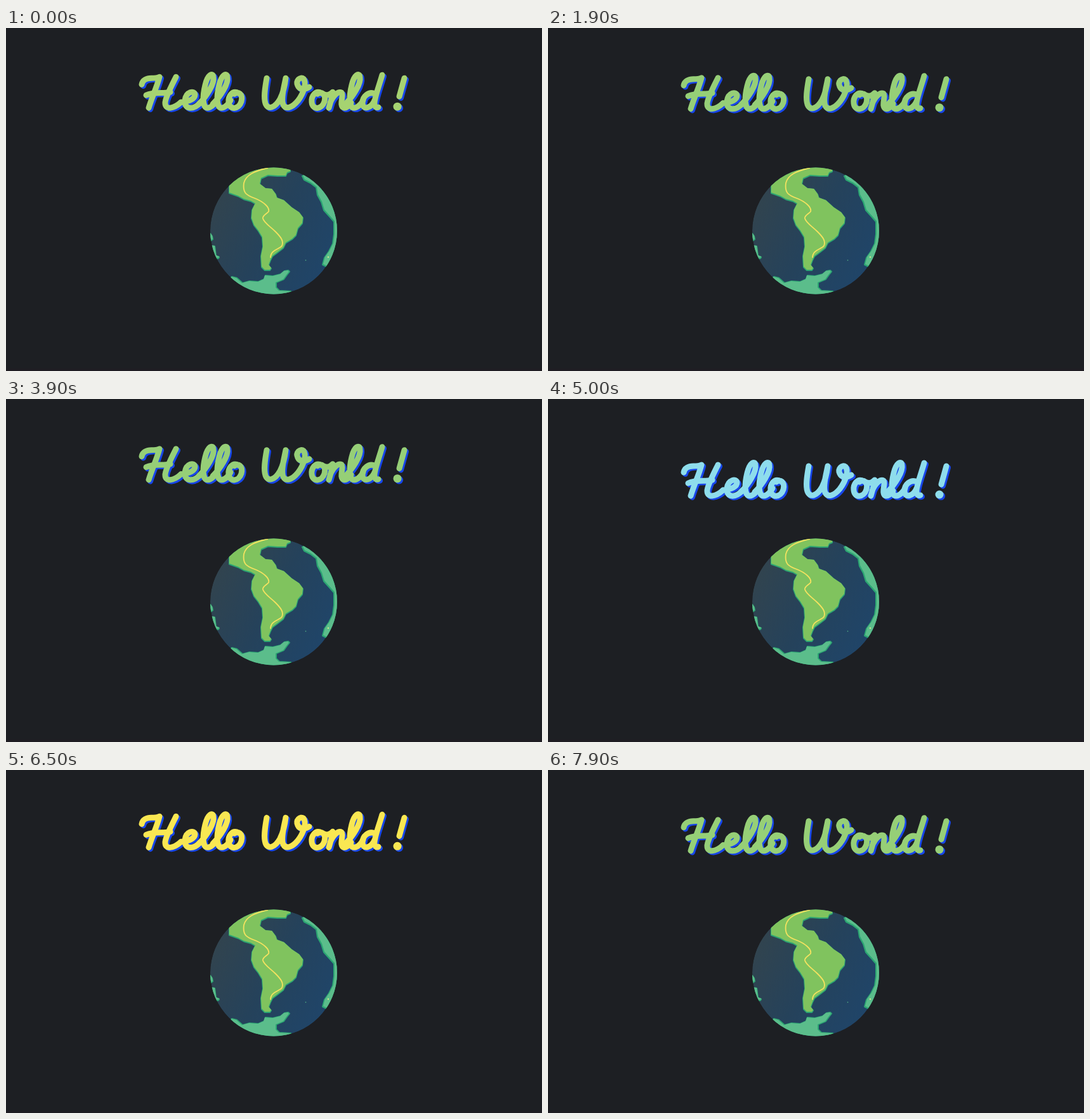
An HTML page for the animation above (8 s loop, 845 by 542 pixels).

```html
<!DOCTYPE html>
<html lang="en">
<head>
<meta charset="utf-8">
<title>Hello World !</title>
<style>
  html, body { margin: 0; width: 100%; height: 100%; overflow: hidden; background: #1d1f23; }
  svg { display: block; width: 100vw; height: 100vh; }
  .edge { fill: #2ca673; stroke: #2ca673; stroke-width: 2; stroke-linejoin: round; }
</style>
</head>
<body>
<svg viewBox="0 0 845 542" role="img" aria-label="Hello World !">
  <defs>
    <linearGradient id="ocean" x1="0" y1=".2" x2="1" y2=".75">
      <stop offset="0" stop-color="#33444d"/>
      <stop offset=".5" stop-color="#25425b"/>
      <stop offset="1" stop-color="#1f456a"/>
    </linearGradient>
    <clipPath id="disc"><circle cx="422" cy="320.5" r="100"/></clipPath>

    <path id="america" d="M352 215H448V226L443 228L441 233L428 233L413 232L402 237L400 246L409 253L419 254L425 262L427 268L438 272L450 283L462 291L468 299L467 308L460 316L457 327L451 333L441 339L437 347L428 354L420 360L417 366L414 374L418 379L416 382L408 382L403 377L402 360L405 345L404 330L398 320L391 311L387 300L388 287L393 277L386 273L375 270L366 265L352 260Z"/>
    <path id="africa" d="M468 233L471 239L481 244L490 251L492 263L498 274L502 287L511 297L518 305L518 325L516 340L510 352L503 362L500 373L508 377L540 340V250L490 225Z"/>
    <path id="antarctica" d="M355 393L363 395L372 403L383 400L397 401L406 397L408 391L420 392L432 389L438 384L444 383L446 385L442 390L437 397L425 402L425 410L430 415L448 416L450 425H370L350 402Z"/>
    <path id="islands" d="M320 321L325 328L326 333L322 336ZM322 343L329 344L331 359L336 361L335 363L328 364Z"/>

    <path id="ell" d="M304 120C316 108 329 88 327 77C326 70 318 73 314 90C310 106 309 126 318 126C324 126 330 118 332 114"/>
    <path id="oh" d="M367 103C356 97 350 109 351 117C352 130 367 129 371 116C374 104 366 99 360 104"/>

    <g id="lettering" fill="none" stroke="currentColor" stroke-width="9" stroke-linecap="round" stroke-linejoin="round">
      <path d="M214 89C215 82 222 79 229 79C236 79 240 78 242 77C238 93 230 109 225 126M221 106C234 100 250 104 259 101"/>
      <path d="M268 77C262 89 252 108 251 117C250 130 264 128 276 117"/>
      <path d="M276 117C290 116 298 111 298 105C297 98 284 100 282 114C281 130 296 129 306 118"/>
      <use href="#ell"/>
      <use href="#ell" x="22"/>
      <use href="#oh"/>
      <path d="M411 79C408 96 406 110 409 119C413 130 424 126 432 112C438 100 440 88 441 79C438 94 433 112 437 121C441 129 451 126 460 115C470 102 474 86 469 80C464 76 456 83 460 91C463 98 472 97 478 93"/>
      <use href="#oh" x="131"/>
      <path d="M503 105C508 107 512 104 515 101C514 110 511 119 509 126M511 118C516 106 524 99 529 102C533 106 524 124 533 126C537 127 541 122 544 118"/>
      <use href="#ell" x="231"/>
      <path d="M582 104C572 99 562 108 562 118C562 130 576 128 582 112M593 74C588 92 580 112 581 120C582 126 585 126 587 125"/>
      <path d="M628 79L620 108"/>
      <path d="M617 124h.1" stroke-width="13"/>
    </g>
  </defs>

  <rect width="845" height="542" fill="#1d1f23"/>
  <rect y="538" width="845" height="4" fill="#1f1d23"/>

  <g clip-path="url(#disc)">
    <circle cx="422" cy="320.5" r="100" fill="url(#ocean)"/>
    <g class="edge">
      <use href="#america" y="1"/>
      <use href="#africa" x="-1" y="1"/>
      <use href="#antarctica" x="1"/>
      <use href="#islands" y="1"/>
    </g>
    <use href="#america" fill="#80c35e"/>
    <g fill="#5bbd8b">
      <use href="#africa"/>
      <use href="#antarctica"/>
      <use href="#islands"/>
      <circle cx="472.5" cy="367" r=".8"/>
    </g>
    <circle cx="508" cy="362" r="1.3" fill="#c5e88c"/>
    <path d="M413 221C392 226 378 232 375 245C373 260 378 264 392 269C405 274 416 283 414 290C411 294 404 296 405 301C407 308 416 313 425 322C434 331 438 337 435 344C431 350 417 350 417 363" fill="none" stroke="#f4e25f" stroke-width="1.8"/>
  </g>

  <g id="title">
    <use href="#lettering" x="2.5" y="2.3" color="#1746ea"/>
    <use id="face" href="#lettering"/>
  </g>
</svg>
<script>
  const title = document.getElementById('title');
  const face = document.getElementById('face');

  const STEP = 100, PERIOD = 2000, START = 1000, RISE = 1750;
  const LOW = 95, HIGH = 64, DRAWN_AT = 68;
  const BLUE = [142, 221, 236], GREEN = [148, 207, 120], YELLOW = [255, 232, 80];

  const bezier = (a, b, s) => 3 * a * s * (1 - s) ** 2 + 3 * b * s * s * (1 - s) + s ** 3;

  // Same curve as the CSS "ease" keyword.
  function ease(x) {
    let lo = 0, hi = 1;
    for (let i = 0; i < 24; i++) {
      const mid = (lo + hi) / 2;
      if (bezier(0.25, 0.25, mid) < x) lo = mid; else hi = mid;
    }
    return bezier(0.1, 1, lo);
  }

  const mix = (a, b, k) => a + (b - a) * k;
  const blend = (a, b, k) => `rgb(${a.map((v, i) => Math.round(mix(v, b[i], k)))})`;

  // Slow rise through blue, green and yellow, then a quick drop back.
  function pose(ms) {
    const t = (ms + PERIOD - START) % PERIOD;
    if (t >= RISE) {
      const k = ease((t - RISE) / (PERIOD - RISE));
      return { top: mix(HIGH, LOW, k), color: blend(YELLOW, BLUE, k) };
    }
    const u = t / RISE;
    return {
      top: mix(LOW, HIGH, ease(u)),
      color: u < 0.5 ? blend(BLUE, GREEN, ease(u * 2)) : blend(GREEN, YELLOW, ease(u * 2 - 1))
    };
  }

  function draw(ms) {
    const { top, color } = pose(Math.floor(ms / STEP) * STEP % PERIOD);
    title.setAttribute('transform', `translate(0 ${(top - DRAWN_AT).toFixed(2)})`);
    face.setAttribute('color', color);
  }

  let origin;
  function tick(now) {
    origin ??= now;
    draw(now - origin);
    requestAnimationFrame(tick);
  }
  draw(0);
  requestAnimationFrame(tick);
</script>
</body>
</html>
```
